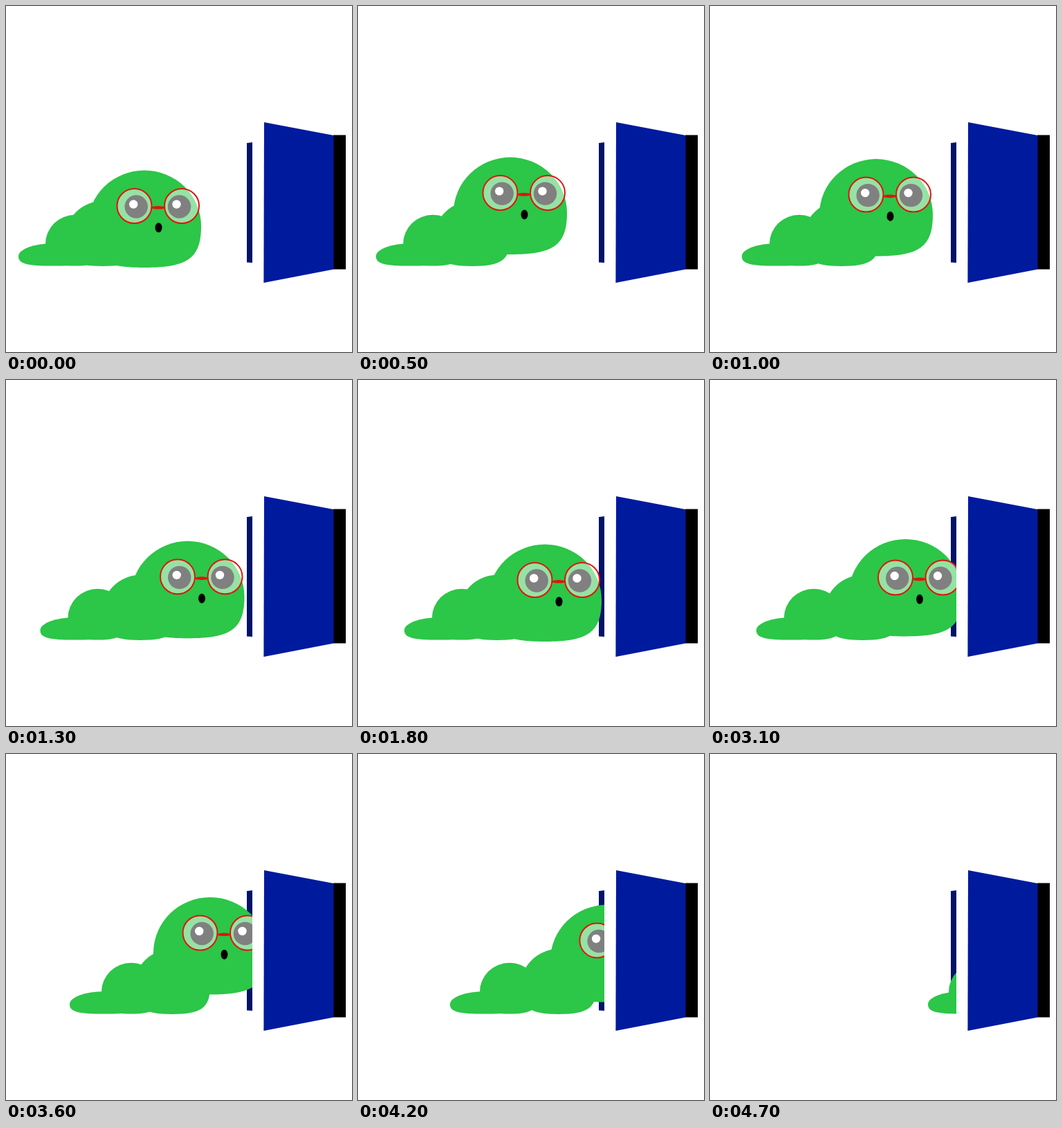
These frames come from a looping animation (500 px wide and 500 px high, 4810 ms). An HTML page with a canvas:

```html
<!DOCTYPE html>
<html lang="en">
<head>
<meta charset="utf-8">
<title>Caterpillar at the door</title>
<style>
  html, body { margin: 0; width: 100%; height: 100%; overflow: hidden; background: #fff; }
  canvas { display: block; }
</style>
</head>
<body>
<canvas id="stage" width="500" height="500"></canvas>
<script>
const ctx = document.getElementById('stage').getContext('2d');
const LOOP = 4810, STEP = 100, LAST = 47;
const GREEN = '#2cc648', RED = '#e0140c', BLUE = '#001a9e', NAVY = '#001468';

// 0 before a, 1 after b; power 2 accelerates
function ramp(t, a, b, power = 1) {
  return Math.min(1, Math.max(0, (t - a) / (b - a))) ** power;
}

// The rear crawls in bursts, then is pulled through the door
function rear(t, first, second, third, walk, pull) {
  return first * ramp(t, .3, 1) + second * ramp(t, 1.2, 1.8) + third * ramp(t, 3.2, 3.6)
    + walk * ramp(t, 3.6, 4.2) + pull * ramp(t, 4.2, 4.7, 2);
}

// The front stretches ahead, leans in, then rushes off
function front(t, reach, landed, settle, lean, rush) {
  return reach * ramp(t, 0, 1) + settle * ramp(t, 1, landed)
    + lean * ramp(t, 2.6, 3.6) + rush * ramp(t, 3.6, 4.7, 2);
}

function headLift(t) {
  const hop = 21 * Math.sin(Math.PI * ramp(t, 0, 1.4));
  const rise = 30.5 * (ramp(t, 2.6, 3.6, 2) - ramp(t, 3.6, 4.6, 2));
  return -hop - rise;
}

function nod(t) {
  return 25 * (ramp(t, 2, 2.6) - ramp(t, 2.6, 3.2));
}

function polygon(color, points) {
  ctx.fillStyle = color;
  ctx.beginPath();
  points.forEach(([x, y]) => ctx.lineTo(x, y));
  ctx.fill();
}

function oval(color, x, y, rx, ry = rx) {
  ctx.fillStyle = color;
  ctx.beginPath();
  ctx.ellipse(x, y, rx, ry, 0, 0, Math.PI * 2);
  ctx.fill();
}

// Dome with a flattened base; x is its middle, y its bottom
function blob(x, y, sx, sy = sx) {
  ctx.save();
  ctx.translate(x, y);
  ctx.scale(sx, sy);
  ctx.fillStyle = GREEN;
  ctx.beginPath();
  ctx.ellipse(0, -60, 82, 80.5, 0, Math.PI, Math.PI * 2);
  ctx.bezierCurveTo(82, -13, 62, 0, 0, 0);
  ctx.bezierCurveTo(-62, 0, -82, -13, -82, -60);
  ctx.fill();
  ctx.restore();
}

function eye(lensX, pupilX) {
  oval('rgba(255,255,255,.5)', lensX, 289, 25);
  oval('#808080', pupilX, 290, 16.7);
  oval('#fff', pupilX - 4, 286.5, 6.2);
  ctx.strokeStyle = RED;
  ctx.lineWidth = 2;
  ctx.beginPath();
  ctx.arc(lensX, 289, 25, 0, Math.PI * 2);
  ctx.stroke();
}

function face(dx, dy) {
  ctx.save();
  ctx.translate(dx, dy);
  eye(185.5, 188.2);
  eye(254, 250.5);
  oval(RED, 220, 291.3, 10, 2.3);
  oval('#000', 220.5, 320.3, 5, 7);
  ctx.restore();
}

function draw(t) {
  ctx.fillStyle = '#fff';
  ctx.fillRect(0, 0, 500, 500);

  polygon(NAVY, [[348, 198], [356, 197], [356, 371], [348, 370.5]]);
  polygon('#000', [[473, 186.5], [491, 186.5], [491, 380.5], [473, 380.5]]);
  polygon(BLUE, [[373, 168], [473.5, 187], [473.5, 380.5], [372.4, 400]]);

  // Everything past the door frame is hidden
  ctx.save();
  ctx.beginPath();
  ctx.rect(0, 0, 356, 500);
  ctx.clip();
  blob(68 + rear(t, 28, 21, 25, 41, 182), 375.5, .61, .23);
  blob(100 + rear(t, 29, 21, 31, 38, 169), 375.5, .525);
  blob(140 + front(t, 50, 1.8, 11, 39, 168), 376, .67);
  const dx = front(t, 40, 1.4, 30, 25, 218), dy = headLift(t);
  blob(200 + dx, 378 + dy, 1);
  face(dx, dy + nod(t));
  ctx.restore();
}

const start = performance.now();
function tick() {
  const ms = (performance.now() - start) % LOOP;
  draw(Math.min(LAST, Math.floor(ms / STEP)) * STEP / 1000);
  requestAnimationFrame(tick);
}
tick();
</script>
</body>
</html>
```
